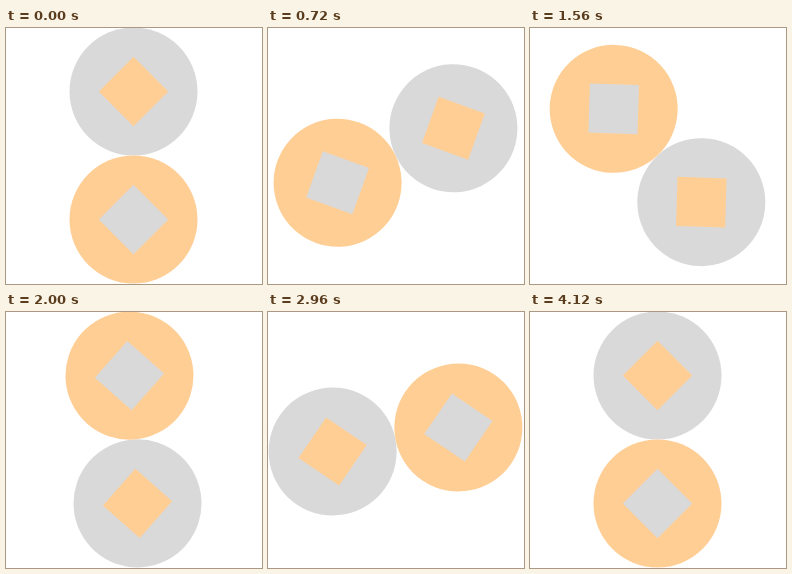
An HTML page that plays this animation: 256 by 256 pixels, repeating every 4.22 s.

```html
<!DOCTYPE html>
<html>
<head>
<meta charset="utf-8">
<style>
html, body { margin: 0; height: 100%; overflow: hidden; background: #fff; }
svg { display: block; width: 100%; height: 100%; }
.gray { fill: #d9d9d9; }
.orange { fill: #ffce95; }
</style>
</head>
<body>
<svg viewBox="0 0 256 256">
  <defs>
    <circle id="disc" r="64"/>
    <path id="diamond" d="M0-34.7 34.7 0 0 34.7-34.7 0Z"/>
  </defs>
  <g id="pair">
    <g transform="translate(0 -64)">
      <use href="#disc" class="gray"/>
      <use href="#diamond" class="orange"/>
    </g>
    <g transform="translate(0 64)">
      <use href="#disc" class="orange"/>
      <use href="#diamond" class="gray"/>
    </g>
  </g>
</svg>
<script>
const LOOP = 4220, TICK = 40, LAST = 103, STEPS = 100;
const pair = document.getElementById('pair');

function draw(now) {
  const tick = Math.min(LAST, Math.floor((now % LOOP) / TICK));
  // The turn pauses for one tick after every 25, three times per loop.
  const pauses = Math.min(3, Math.max(0, Math.floor((tick - 1) / 25)));
  const angle = (tick - pauses) * 360 / STEPS;
  pair.setAttribute('transform', `translate(127.5 127.5) rotate(${angle})`);
}

let start;
function loop(now) {
  start ??= now;
  draw(now - start);
  requestAnimationFrame(loop);
}
draw(0);
requestAnimationFrame(loop);
</script>
</body>
</html>
```
